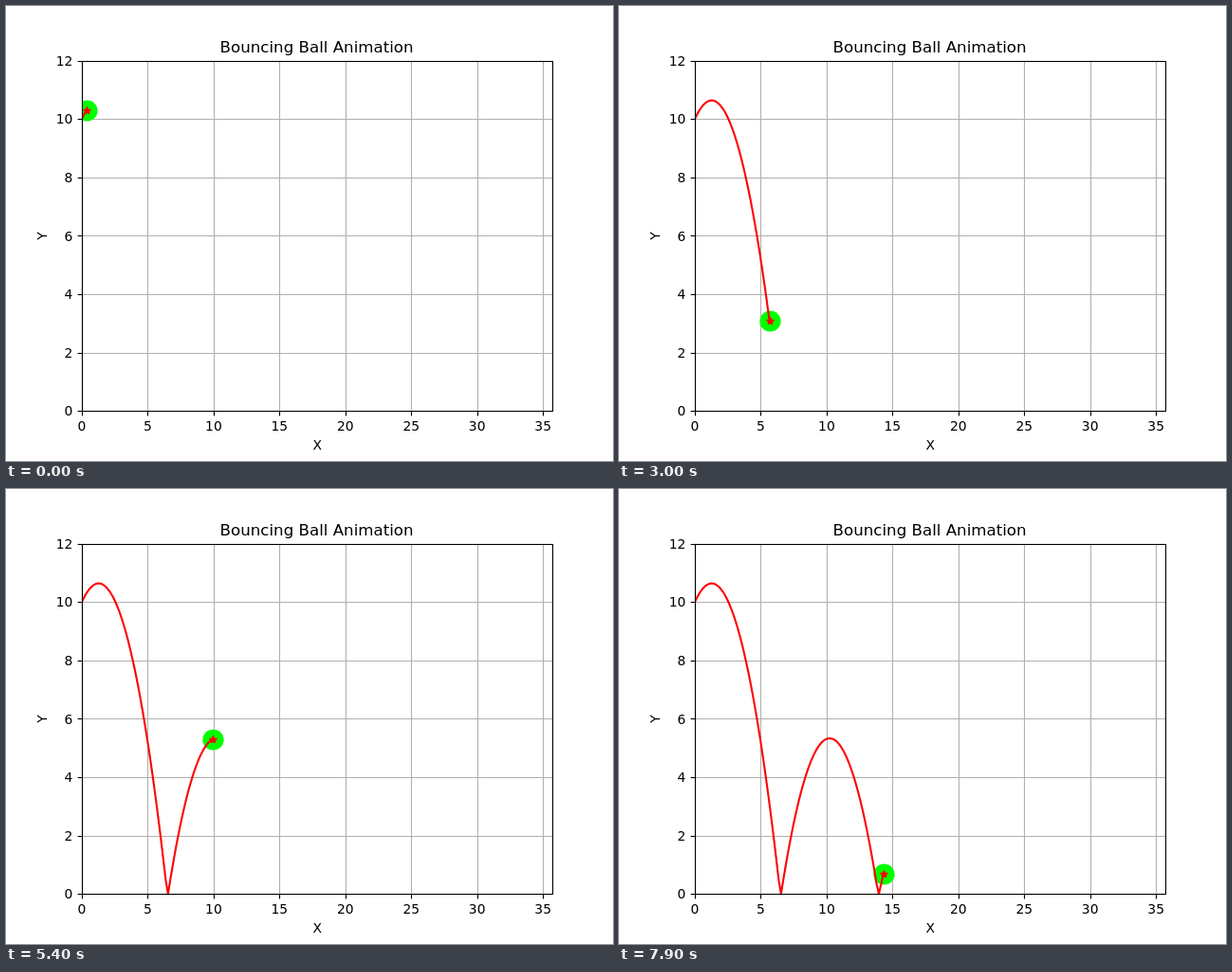
An HTML page that plays this animation: 640x480 px, repeating every 8000 ms.

```html
<!DOCTYPE html>
<html lang="en">
<head>
<meta charset="utf-8">
<title>Bouncing Ball Animation</title>
<style>
  html, body { margin: 0; width: 100%; height: 100%; overflow: hidden; background: #fff; }
  svg { display: block; width: 640px; height: 480px; }
  text { font: 13.889px "DejaVu Sans", sans-serif; text-anchor: middle; }
  .title { font-size: 16.667px; }
  .right { text-anchor: end; }
  .grid { stroke: #b0b0b0; stroke-width: 1.11; }
  .axis { stroke: #000; stroke-width: 1.11; fill: none; }
  .trail { stroke: #f00; stroke-width: 2.083; fill: none; stroke-linejoin: round; stroke-linecap: square; }
  .star { fill: #f00; stroke: #f00; stroke-width: 1.39; stroke-linejoin: bevel; }
</style>
</head>
<body>
<svg viewBox="0 0 640 480">
  <clipPath id="plot"><rect x="80" y="58" width="496" height="369"/></clipPath>
  <g id="grid"></g>
  <g clip-path="url(#plot)">
    <circle id="ball" r="11.1" fill="#0f0"/>
    <path id="trail" class="trail"/>
    <path id="star" class="star" d="M0-4L-1-1L-4-1L-2 0L-2 3L0 2L2 3L2 0L4-1L1-1Z"/>
  </g>
  <g id="ticks"></g>
  <rect class="axis" x="80.5" y="58.5" width="496" height="369"/>
  <text class="title" x="327.6" y="49">Bouncing Ball Animation</text>
  <text x="328.3" y="467.5">X</text>
  <text transform="translate(43 242.4) rotate(-90)">Y</text>
</svg>
<script>
const $ = id => document.getElementById(id);
const SPEED = 5 * Math.SQRT1_2, G = 9.81, DT = 0.05, BOUNCE = 0.7;
const STEPS = 80, STEP_MS = 100, LEAD = 2;
const X_MAX = SPEED * 10.1, Y_MAX = 12;

const px = x => 80 + x / X_MAX * 496;
const py = y => 427.2 - y / Y_MAX * 369.6;
const snap = v => Math.floor(v + 0.5) + 0.5;

function add(parent, tag, attrs, label = "") {
  const el = document.createElementNS("http://www.w3.org/2000/svg", tag);
  for (const key in attrs) el.setAttribute(key, attrs[key]);
  el.textContent = label;
  $(parent).append(el);
}

for (let v = 0; v <= 35; v += 5) {
  const x = snap(px(v));
  add("grid", "path", { class: "grid", d: `M${x} 58V427` });
  add("ticks", "path", { class: "axis", d: `M${x} 427.5V432.4` });
  add("ticks", "text", { x: px(v), y: 448 }, v);
}
for (let v = 0; v <= 12; v += 2) {
  const y = snap(py(v));
  add("grid", "path", { class: "grid", d: `M80 ${y}H576` });
  add("ticks", "path", { class: "axis", d: `M80.5 ${y}H75.6` });
  add("ticks", "text", { class: "right", x: 70.3, y: Math.round(py(v) + 5.27) }, v);
}

// Flight path: constant gravity, landing snaps to the floor and loses speed.
const points = [];
for (let i = 0, y = 10, vy = SPEED; i < STEPS + LEAD; i++) {
  points.push([px(SPEED * DT * i), py(y)]);
  y += vy * DT - G * DT * DT / 2;
  vy -= G * DT;
  if (y < 0) {
    y = 0;
    vy *= -BOUNCE;
  }
}

let shown = -1;
function draw() {
  const step = Math.floor(performance.now() / STEP_MS) % STEPS;
  if (step !== shown) {
    shown = step;
    const last = step + LEAD;
    const [x, y] = points[last].map(snap);
    const place = `translate(${x} ${y})`;
    $("ball").setAttribute("transform", place);
    $("star").setAttribute("transform", place);
    $("trail").setAttribute("d", "M" + points.slice(0, last + 1).join("L"));
  }
  requestAnimationFrame(draw);
}
draw();
</script>
</body>
</html>
```
